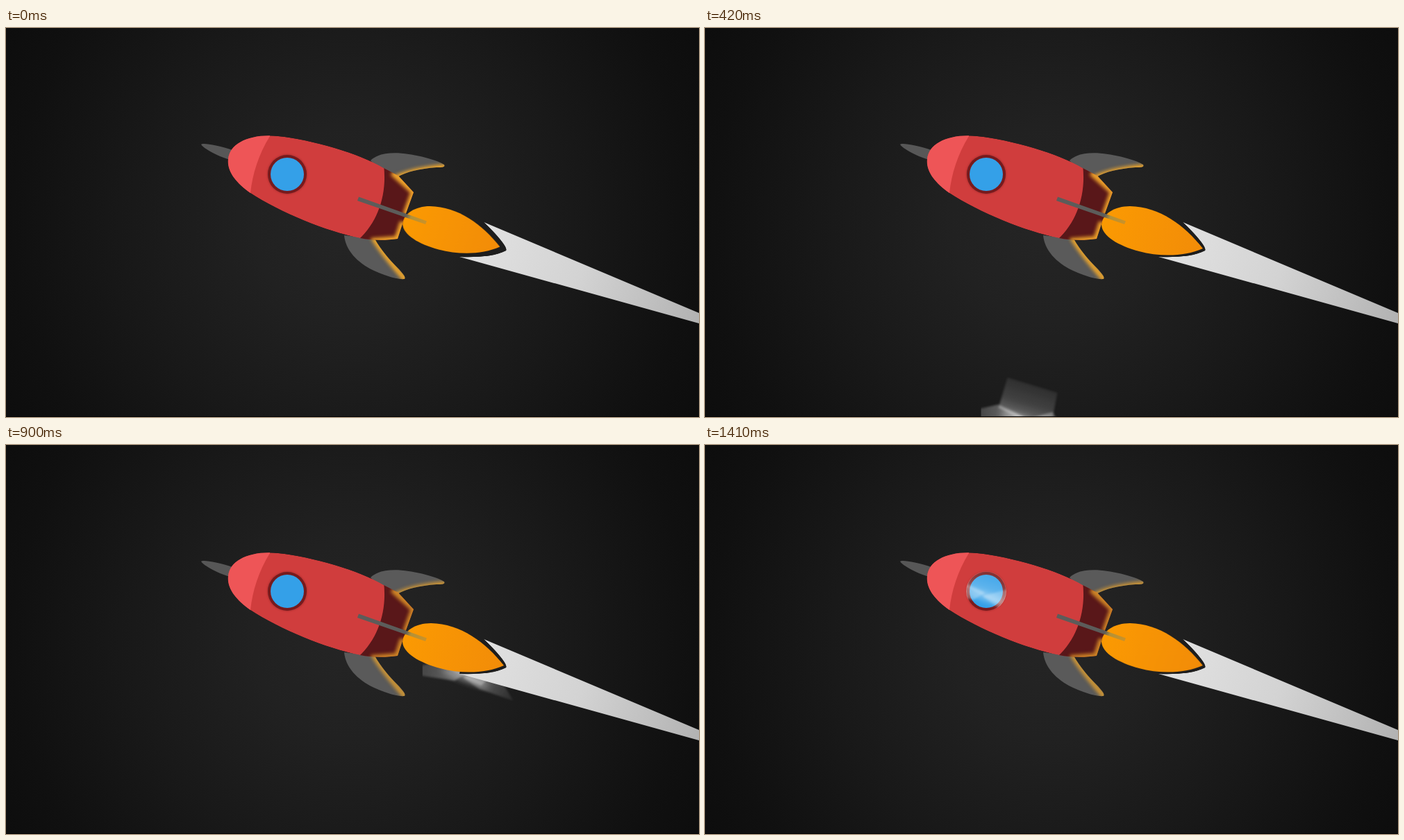
An HTML page that plays this animation: 998 by 561 pixels, repeating every 1.44 s.

```html
<!DOCTYPE html>
<html lang="en">
<head>
<meta charset="utf-8">
<title>Rocket</title>
<style>
  html, body { margin: 0; width: 100%; height: 100%; overflow: hidden; background: #111; }
  svg { display: block; width: 100vw; height: 100vh; }
  #flame { transform-origin: 575px 257px; }
</style>
</head>
<body>
<svg viewBox="0 0 998 561" preserveAspectRatio="none">
  <defs>
    <radialGradient id="sky" gradientUnits="userSpaceOnUse" cx="499" cy="281" r="575">
      <stop offset="0" stop-color="#252525"/>
      <stop offset=".25" stop-color="#212121"/>
      <stop offset=".55" stop-color="#191919"/>
      <stop offset=".85" stop-color="#101010"/>
      <stop offset="1" stop-color="#0d0d0d"/>
    </radialGradient>
    <linearGradient id="smoke" gradientUnits="userSpaceOnUse" x1="690" y1="300" x2="998" y2="420">
      <stop offset="0" stop-color="#e0e0e0"/>
      <stop offset=".45" stop-color="#d3d3d3"/>
      <stop offset="1" stop-color="#b2b2b2"/>
    </linearGradient>
    <linearGradient id="fire" gradientUnits="userSpaceOnUse" x1="571" y1="270" x2="717" y2="318">
      <stop offset="0" stop-color="#fb9a02"/>
      <stop offset="1" stop-color="#f28c08"/>
    </linearGradient>
    <linearGradient id="bar" gradientUnits="userSpaceOnUse" x1="506" y1="246" x2="605" y2="281">
      <stop offset=".7" stop-color="#5c5c5a"/>
      <stop offset=".78" stop-color="#b39138"/>
      <stop offset="1" stop-color="#c9922a"/>
    </linearGradient>
    <linearGradient id="veil" gradientUnits="userSpaceOnUse" x1="76" y1="8" x2="60" y2="62">
      <stop offset="0" stop-color="#fff" stop-opacity=".07"/>
      <stop offset=".55" stop-color="#fff" stop-opacity=".17"/>
      <stop offset="1" stop-color="#fff" stop-opacity=".38"/>
    </linearGradient>
    <linearGradient id="left" gradientUnits="userSpaceOnUse" x1="0" y1="52" x2="60" y2="60">
      <stop offset="0" stop-color="#fff" stop-opacity=".2"/>
      <stop offset="1" stop-color="#fff" stop-opacity=".42"/>
    </linearGradient>
    <linearGradient id="right" gradientUnits="userSpaceOnUse" x1="130" y1="95" x2="66" y2="60">
      <stop offset="0" stop-color="#fff" stop-opacity=".08"/>
      <stop offset="1" stop-color="#fff" stop-opacity=".42"/>
    </linearGradient>
    <filter id="soft1" x="-20%" y="-20%" width="140%" height="140%"><feGaussianBlur stdDeviation="1.5"/></filter>
    <filter id="soft2" x="-40%" y="-40%" width="180%" height="180%"><feGaussianBlur stdDeviation="2.4"/></filter>
    <filter id="soft5" x="-40%" y="-150%" width="180%" height="400%"><feGaussianBlur stdDeviation="5"/></filter>

    <path id="hull" d="M320 189C322 166 352 152 392 156C440 161 510 181 544 202L565 213L587 237L575 270L564 304C545 307 525 306 510 303C460 293 395 266 352 238C330 222 318 206 320 189Z"/>
    <path id="fins" d="M525 191C535 181 555 178 580 182C600 185 622 191 631 197C633 201 628 201 620 201C595 203 578 207 563 215L545 215ZM487 299C489 320 505 338 530 350C550 359 566 363 574 362C576 359 572 355 566 348C552 334 540 320 531 304Z"/>
    <clipPath id="inHull"><use href="#hull"/></clipPath>
    <clipPath id="inFins"><use href="#fins"/></clipPath>
    <clipPath id="inGlass"><circle cx="405" cy="211" r="29"/></clipPath>
    <clipPath id="starBox"><rect width="140" height="110" y="-6"/></clipPath>

    <g id="star" clip-path="url(#starBox)">
      <path d="M38 0L110 22L103 58L84 74L25 44Z" fill="url(#veil)" filter="url(#soft1)"/>
      <path d="M-6 46L25 39L62 57L46 67L-6 59Z" fill="url(#left)" filter="url(#soft1)"/>
      <path d="M103 50L131 96L82 79L58 62Z" fill="url(#right)" filter="url(#soft1)"/>
      <ellipse cx="62" cy="63" rx="36" ry="5" transform="rotate(20 62 63)" fill="#fff" opacity=".55" filter="url(#soft5)"/>
    </g>
  </defs>

  <rect width="998" height="561" fill="url(#sky)"/>
  <use id="star1" href="#star"/>
  <use id="star2" href="#star"/>

  <path d="M688 280L998 411V426L653 330C680 331 705 329 720 321C723 317 708 299 688 280Z" fill="url(#smoke)"/>
  <path d="M653 330C680 331 705 329 720 321C723 317 708 299 688 280L660 300Z" fill="#1d1d1d"/>

  <path d="M281 168C283 165 305 169 326 176L322 190C303 184 285 174 281 168Z" fill="#575757"/>
  <use href="#fins" fill="#5a5a5a"/>
  <g clip-path="url(#inFins)">
    <path class="glow" d="M636 200C600 203 580 208 560 217M577 365C556 340 541 322 529 302" fill="none" stroke="#eda52c" stroke-width="8" filter="url(#soft2)"/>
  </g>

  <g clip-path="url(#inHull)">
    <use href="#hull" fill="#d03d3d"/>
    <path d="M380 150V156C364 182 355 210 352 238V250H300V140Z" fill="#ee5557"/>
    <path d="M544 198C549 240 536 279 508 305L560 320L600 240Z" fill="#591719"/>
    <path class="glow" d="M557 208L588 236L576 270M526 308L564 305L572 280" fill="none" stroke="#f0a42a" stroke-width="10" filter="url(#soft2)"/>
  </g>

  <circle cx="405" cy="211" r="28" fill="#6d1416" opacity=".6" filter="url(#soft1)"/>
  <circle cx="405" cy="211" r="28" fill="#771a1d"/>
  <circle cx="405" cy="211" r="24" fill="#34a0e8"/>
  <g clip-path="url(#inGlass)"><use id="star3" href="#star"/></g>

  <path id="flame" d="M571 284C572 268 590 257 612 257C655 258 690 284 717 318C690 330 655 330 625 322C595 314 572 300 571 284Z" fill="url(#fire)"/>
  <path d="M508 243.500L606 278.500L604 283L506 249Z" fill="url(#bar)"/>
  <rect y="560" width="998" height="1" fill="#030303"/>
</svg>
<script>
  const LOOP = 1440, VX = 1.302, VY = 0.925;
  const all = [];

  const play = (el, frames, duration = LOOP) =>
    all.push(el.animate(frames, { duration, iterations: Infinity }));

  // A star crosses at constant speed, passing (x, y) at time t.
  function fly(id, t, x, y, fade) {
    const el = document.getElementById(id);
    const at = s => `translate(${x + VX * (s - t)}px, ${y + VY * (s - t)}px)`;
    play(el, [{ transform: at(0) }, { transform: at(LOOP) }]);
    play(el, fade.map(([s, opacity]) => ({ offset: s / LOOP, opacity })));
  }

  fly('star1', 300, 240, 392, [[0, 1], [LOOP, 1]]);
  fly('star2', 660, 286, 50, [[0, 1], [840, 1], [900, .85], [960, 0], [LOOP, 0]]);
  fly('star3', 1410, 340, 155, [[0, 0], [1300, 0], [1300, .75], [LOOP, .75]]);

  // Flame flicker
  play(document.getElementById('flame'), [
    { offset: 0, transform: 'scale(.96)' },
    { offset: .5, transform: 'scale(1)' },
    { offset: .75, transform: 'scale(1)' },
    { offset: 1, transform: 'scale(.96)' }
  ], 120);

  document.querySelectorAll('.glow').forEach(el => play(el, [
    { offset: 0, opacity: 1 },
    { offset: 660 / LOOP, opacity: .95 },
    { offset: 900 / LOOP, opacity: .78 },
    { offset: 1, opacity: .78 }
  ]));

  // Keep every part on one shared clock.
  const start = document.timeline.currentTime;
  all.forEach(a => { a.startTime = start; });
</script>
</body>
</html>
```
